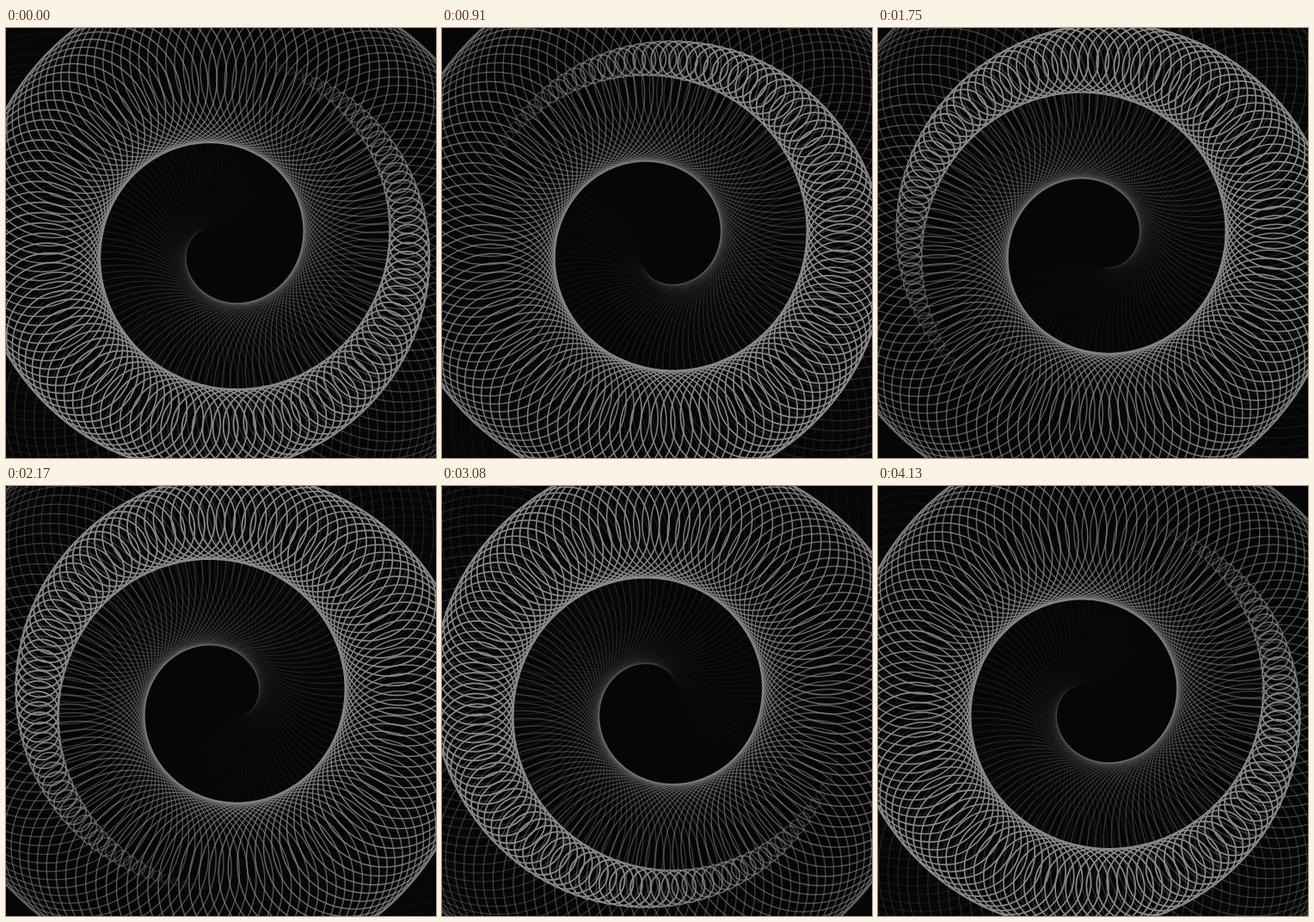
Animation, 500 px wide and 500 px high, one loop 4200 ms. Source, as an HTML page with a canvas:

```html
<!DOCTYPE html>
<html lang="en">
<head>
<meta charset="utf-8">
<title>Spiral of growing rings</title>
<style>
  html, body { margin: 0; width: 100%; height: 100%; overflow: hidden; background: #060606; }
  canvas { display: block; width: 500px; height: 500px; }
</style>
</head>
<body>
<canvas id="stage" width="500" height="500"></canvas>
<script>
const ctx = document.getElementById('stage').getContext('2d');

const STEP = 70, STEPS = 60;          // one loop: 60 steps of 70 ms
const CX = 252.7, CY = 251.7;
const ORBIT = 216;                    // distance of ring centres from the middle
const COUNT = 120;                    // ring centres on the orbit
const GROWTH = 100, MAX_R = 200;      // radius gained per loop, largest radius
const BIRTH = -84 / 360;              // where new rings appear at the start, in turns

const wrap = x => ((x % 1) + 1) % 1;

function opacity(r) {
  const fadeIn = Math.min(1, r / 24);
  const fadeOut = Math.min(1, 1.8 * (1 - r / MAX_R) ** 1.5);
  return fadeIn * fadeOut;
}

function ring(turn, r) {
  const a = turn * 2 * Math.PI;
  ctx.globalAlpha = opacity(r);
  ctx.lineWidth = 1.9 - 0.9 * r / MAX_R;
  ctx.beginPath();
  ctx.arc(CX + ORBIT * Math.cos(a), CY + ORBIT * Math.sin(a), r, 0, 2 * Math.PI);
  ctx.stroke();
}

function draw(step) {
  ctx.globalAlpha = 1;
  ctx.fillStyle = '#060606';
  ctx.fillRect(0, 0, 500, 500);
  ctx.strokeStyle = '#8a8a8a';
  for (let i = 0; i < COUNT; i++) {
    const turn = i / COUNT;
    // rounding keeps a newborn ring from wrapping to full size
    const age = wrap(Math.round((turn - BIRTH + step / STEPS) * COUNT) / COUNT);
    ring(turn, (age + 1) * GROWTH);
    if (age > 0) ring(turn, age * GROWTH);
  }
}

const start = performance.now();
let shown = -1;

function tick() {
  const step = Math.floor((performance.now() - start) / STEP) % STEPS;
  if (step !== shown) draw(shown = step);
  requestAnimationFrame(tick);
}
tick();
</script>
</body>
</html>
```
